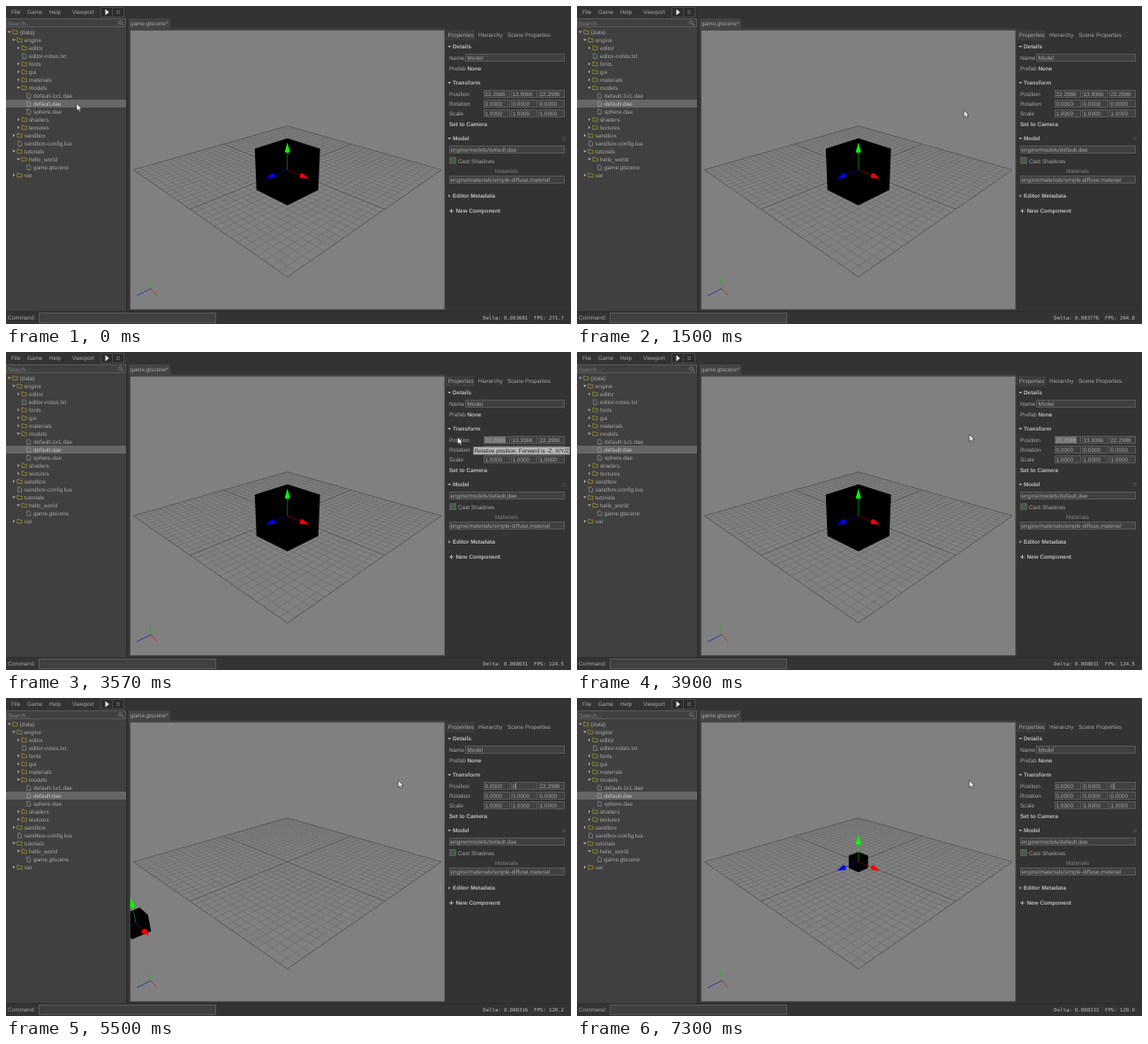
Animation, 640 px wide and 360 px high, one loop 7.63 s. Source, as an HTML page:

```html
<!DOCTYPE html>
<html lang="en">
<head>
<meta charset="utf-8">
<title>Scene editor</title>
<style>
html, body { margin: 0; width: 100%; height: 100%; overflow: hidden; background: #333; }
svg { display: block; width: 640px; height: 360px; }
text { font: 6.4px "Liberation Sans", Arial, sans-serif; fill: #a6a6a6; white-space: pre; text-rendering: geometricPrecision; }
.b { font-weight: bold; fill: #bcbcbc; }
.dim { fill: #808080; }
.lit { fill: #c4c4c4; }
.tip { fill: #222; }
.mono { font: 5.65px "DejaVu Sans Mono", "Liberation Mono", monospace; fill: #c0c0c0; text-anchor: end; }
.mid { text-anchor: middle; }
</style>
</head>
<body>
<svg id="stage" viewBox="0 0 640 360"></svg>
<script>
const LOOP = 7630;
const stage = document.getElementById('stage');

function el(name, attrs, parent = stage) {
  const node = document.createElementNS(stage.namespaceURI, name);
  for (const key in attrs) node.setAttribute(key, attrs[key]);
  return parent.appendChild(node);
}
const rect = (x, y, width, height, fill, parent) => el('rect', { x, y, width, height, fill }, parent);
const path = (d, fill = 'none', stroke = 'none', width = 1, parent) =>
  el('path', { d, fill, stroke, 'stroke-width': width }, parent);
// y is the vertical centre of the line
function label(x, y, string, cls = '', parent) {
  const node = el('text', { x, y: y + 2.3, class: cls }, parent);
  node.textContent = string;
  return node;
}
// filled box with a one pixel border inside its edge
function box(x, y, w, h, fill = '#404040', stroke = '#5a5a5a') {
  el('rect', { x: x + .5, y: y + .5, width: w - 1, height: h - 1, fill, stroke });
}
function arrow(x, y, open) {
  path(open ? `M${x - 1.9} ${y - 1}h3.8l-1.9 2.2z` : `M${x - .9} ${y - 1.8}v3.6l2.1 -1.8z`, '#b0b0b0');
}
function burger(x, y, color) {
  path(`M${x} ${y - 1.5}h4m-4 1.5h4m-4 1.5h4`, 'none', color, .6);
}

// Menu bar
rect(0, 0, 640, 14, '#333');
[[6, 'File'], [24, 'Game'], [49, 'Help'], [75, 'Viewport']].forEach(([x, s]) => label(x, 7, s));
box(107, 1, 14, 12, '#2c2c2c', '#4a4a4a');
box(120, 1, 14, 12, '#2c2c2c', '#4a4a4a');
path('M112.5 3.5v7l4.3 -3.5z', '#e4e4e4');
burger(125, 7, '#808080');

// File tree
rect(0, 14, 136.5, 332, '#404040');
rect(136, 14, 1, 332, '#2a2a2a');
box(0, 14, 136, 10);
label(2, 19.3, 'Search...', 'dim');
el('circle', { cx: 129.3, cy: 18.6, r: 1.9, fill: 'none', stroke: '#888', 'stroke-width': .7 });
path('M130.8 20l2.2 2.2', 'none', '#888', .9);
rect(0, 106, 136, 9, '#666');

// depth, kind (o open folder, c closed folder, f file), name
const tree = `0o{data} 1oengine 2ceditor 2feditor-notes.txt 2cfonts 2cgui 2cmaterials 2omodels
  3fdefault-1x1.dae 3fdefault.dae 3fsphere.dae 2cshaders 2ctextures 1csandbox
  1fsandbox-config.lua 1otutorials 2ohello_world 3fgame.gtscene 1cvar`.split(/\s+/);
tree.forEach((row, i) => {
  const y = 29.5 + 9 * i, kind = row[1], x = 5.1 * row[0];
  if (kind === 'f') path(`M${x + 8.5} ${y - 2.5}h2.4l1.5 1.5v3.9h-3.9z`, 'none', '#b4b4b4', .5);
  else {
    arrow(x + 3.8, y, kind === 'o');
    path(`M${x + 7.7} ${y + 2.2}v-4.4h2l.8 .9h2.5v3.5z`, 'none', '#b4a41c', .65);
  }
  label(x + 15.7, y, row.slice(2), i === 9 ? 'lit' : '');
});

// Viewport frame
rect(137, 14, 361, 332, '#333');
rect(139, 14, 47, 12, '#444');
label(141, 19.5, 'game.gtscene*');
rect(139.5, 25.5, 358, 319, '#444');
const CX = 318.75, CY = 185.5;
el('rect', { x: 140.75, y: 27.5, width: 356, height: 316 }, el('clipPath', { id: 'view' }));
const view = el('g', { 'clip-path': 'url(#view)' });
rect(140.75, 27.5, 356, 316, '#808080', view);

// Camera at (32, 20, 32) looking at the world origin with a 45 degree field of view
const DIST = Math.hypot(32, 20, 32), FOCAL = 158 / Math.tan(Math.PI / 8);
const SIN = 20 / DIST, COS = Math.sqrt(1 - SIN * SIN), H = Math.SQRT1_2;
const depthOf = ([x, y, z]) => DIST - (x + z) * H * COS - y * SIN;
function project(p) {
  const [x, y, z] = p, k = FOCAL / depthOf(p);
  return [CX + (x - z) * H * k, CY - (y * COS - (x + z) * H * SIN) * k];
}
const join = points => 'M' + points.map(p => p.map(n => n.toFixed(2)).join(' ')).join('L');
const line = (a, b) => join([project(a), project(b)]);

// closed outline, always wound the same way so that overlapping faces add up
function face(points) {
  const flat = points.map(project);
  const area = flat.reduce((sum, [x, y], i) => {
    const [u, v] = flat[(i + 1) % flat.length];
    return sum + x * v - u * y;
  }, 0);
  return join(area < 0 ? flat.reverse() : flat) + 'Z';
}

let minor = '', major = '';
for (let i = -16; i <= 16; i++) {
  const pair = line([i, 0, -16], [i, 0, 16]) + line([-16, 0, i], [16, 0, i]);
  if (i % 16) minor += pair; else major += pair;
}
path(minor, 'none', '#686868', .6, view);
path(major, 'none', '#484848', .7, view);
path('M164 320L162.3 308.5', 'none', '#10c810', .7, view);
path('M164 320L171 327.7', 'none', '#c81818', .7, view);
path('M164 320L148 328', 'none', '#1818c8', .7, view);

const cube = path('', '#000', 'none', 0, view);
const axes = ['#f00', '#0f0', '#00f'].map(color => {
  const shaft = path('', 'none', color, .6, view);
  shaft.setAttribute('opacity', .75);
  return { shaft, cone: path('', color, 'none', 0, view) };
});

// point moved by a along the given axis and by u, v along the other two
function moved(pos, axis, a, u = 0, v = 0) {
  const p = [...pos];
  p[axis] += a;
  p[(axis + 1) % 3] += u;
  p[(axis + 2) % 3] += v;
  return p;
}

function drawModel(pos) {
  let faces = '';
  for (let axis = 0; axis < 3; axis++) for (const side of [-1, 1])
    faces += face([[-1, -1], [-1, 1], [1, 1], [1, -1]].map(([u, v]) => moved(pos, axis, side, u, v)));
  cube.setAttribute('d', faces);

  const len = .0858 * depthOf(pos), radius = .088 * len;
  axes.forEach(({ shaft, cone }, axis) => {
    const tip = moved(pos, axis, len);
    const rim = Array.from({ length: 16 }, (_, i) => {
      const a = i * Math.PI / 8;
      return moved(pos, axis, .67 * len, radius * Math.cos(a), radius * Math.sin(a));
    });
    cone.setAttribute('d', face(rim) + rim.map((p, i) => face([tip, p, rim[(i + 1) % 16]])).join(''));
    shaft.setAttribute('d', line(pos, moved(pos, axis, .67 * len)));
  });
}

// Properties panel
rect(498, 14, 142, 332, '#333');
rect(498, 27, 33, 12, '#3c3c3c');
label(500.5, 33, 'Properties');
label(535, 33, 'Hierarchy');
label(568, 33, 'Scene Properties');
function section(y, name, open = true) {
  arrow(502.3, y, open);
  label(506, y, name, 'b');
}
section(46, 'Details');
label(502, 58.5, 'Name');
box(520, 54, 113, 9);
label(522.5, 58.5, 'Model');
label(502, 71, 'Prefab');
label(522.4, 71, 'None', 'b');
section(87, 'Transform');
const FIELD_X = [541, 572, 603];
['Position', 'Rotation', 'Scale'].forEach((name, i) => {
  const y = 99.5 + 11 * i;
  label(502, y, name);
  FIELD_X.forEach(x => {
    box(x, y - 4.5, 30, 9);
    if (i) label(x + 1.5, y, i === 1 ? '0.0000' : '1.0000');
  });
});
const selection = rect(0, 96, 0, 7.5, '#707070');
const fields = FIELD_X.map(x => label(x + 1.5, 99.5, ''));
const caret = rect(0, 96, .6, 7, '#b4b4b4');
label(502, 133.5, 'Set to Camera', 'b');
section(150, 'Model');
burger(630, 150, '#585858');
box(502, 158, 131, 9);
label(503.5, 162.5, 'engine/models/default.dae');
box(502, 171, 8, 8, '#465c48');
label(512, 175.5, 'Cast Shadows');
label(567, 187, 'Materials', 'dim mid');
box(502, 192, 131, 9);
label(503.5, 196.5, 'engine/materials/simple-diffuse.material');
section(215, 'Editor Metadata', false);
path('M502.3 232h4.4m-2.2 -2.2v4.4', 'none', '#bcbcbc', 1);
label(509.5, 232, 'New Component', 'b');

// Status bar
rect(0, 346, 640, 14, '#333');
rect(0, 345.5, 640, 1, '#2a2a2a');
label(2, 353, 'Command:');
box(37, 347, 201, 12);
const status = label(632, 352.7, '', 'mono');

const tooltip = el('g', {});
el('rect', { x: 529.5, y: 107.5, width: 109, height: 8.5, fill: '#b8b8b8', stroke: '#777', 'stroke-width': .8 }, tooltip);
label(530.4, 111.6, 'Relative position. Forward is -Z. X/Y/Z', 'tip', tooltip);

const pointer = path('M0 0V8L1.9 6.3L3.2 9L4.5 8.4L3.3 5.9H5.7Z', '#fff', '#222', .6);

// Delta and frame rate, renewed each second from 100 ms on
const stats = [
  ['0.003681', '271.7'], ['0.003669', '272.6'], ['0.003776', '264.8'], ['0.017651', '56.7'],
  ['0.008031', '124.5'], ['0.008297', '120.5'], ['0.008316', '120.2'], ['0.008325', '120.1'],
  ['0.008333', '120.0']
];
// start, end, x
const carets = [[2700, 2900, 565.3], [4300, 4830, 546.2], [5500, 5900, 577.2],
  [6300, 6830, 608.2], [7300, LOOP, 608.2]];
// start, end, left, right
const selections = [[2900, 2970, 556, 566], [2970, 3100, 548.5, 566], [3100, 4300, 542, 566],
  [5030, 5500, 573, 597], [5900, 6300, 604, 628]];

const during = (list, t) => list.find(([from, to]) => t >= from && t < to);
const show = (node, on) => node.setAttribute('visibility', on ? 'visible' : 'hidden');
const smooth = u => u * u * (3 - 2 * u);
// the pointer is sampled at 15 steps per second
const steps = (t, from, count) => Math.min(count, Math.max(0, Math.floor((t - from) / 66.6))) / count;

function pointerAt(t) {
  if (t < 1830) {
    const u = steps(t, 960, 12), p = smooth(u ** .9);
    return [80 + 461.3 * p, 110.5 - 5.2 * p + 52 * u * (1 - u)];
  }
  if (t < 3300) return null;
  const p = smooth(steps(t, 3430, 7));
  return [528.3 - 84 * p, 97.3 - 4 * p];
}

function valuesAt(t) {
  const typed = (old, start, done) => t < start ? old : t < done ? '0' : '0.0000';
  return [typed('22.2986', 4300, 5030), typed('13.9366', 5500, 5900), typed('22.2986', 6300, LOOP)];
}

function frame(now) {
  const t = now % LOOP;

  const values = valuesAt(t);
  values.forEach((s, i) => fields[i].textContent = s);
  drawModel(values.map(Number));

  const bar = during(carets, t);
  show(caret, bar);
  if (bar) caret.setAttribute('x', bar[2]);

  const sel = during(selections, t);
  show(selection, sel);
  if (sel) {
    selection.setAttribute('x', sel[2]);
    selection.setAttribute('width', sel[3] - sel[2]);
  }

  const [delta, fps] = stats[Math.floor((t + 900) / 1000)];
  status.textContent = `Delta: ${delta}  FPS: ${fps}`;
  show(tooltip, t >= 2100 && t < 3700);

  const pos = pointerAt(t);
  show(pointer, pos);
  if (pos) pointer.setAttribute('transform', `translate(${pos})`);
}

const begin = performance.now();
function tick() {
  frame(performance.now() - begin);
  requestAnimationFrame(tick);
}
tick();
</script>
</body>
</html>
```
